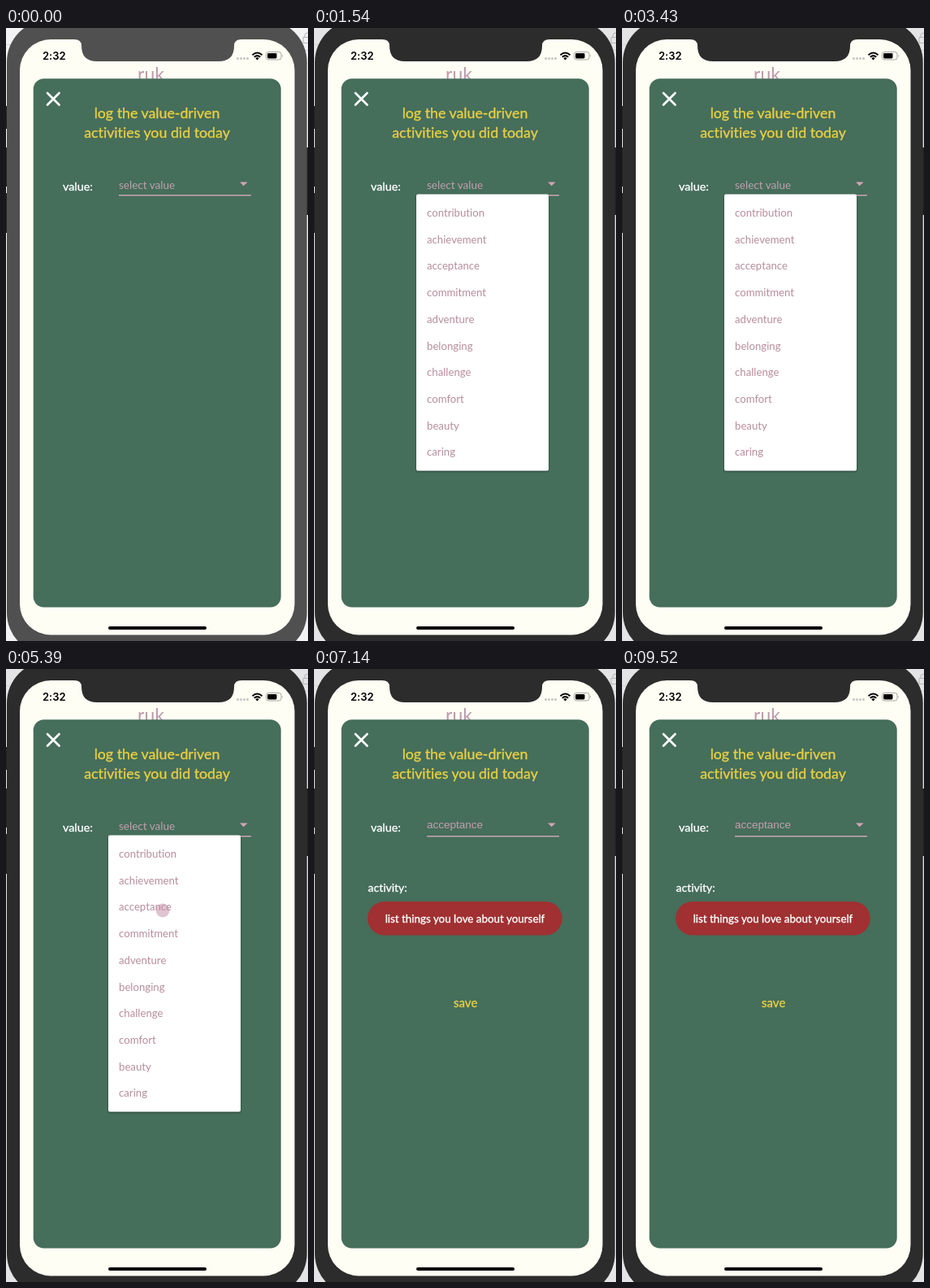
Animation, 372 px wide and 754 px high, one loop 9590 ms. Source, as an HTML page:

```html
<!DOCTYPE html>
<html lang="en">
<head>
<meta charset="utf-8">
<title>Activity log</title>
<style>
  html, body { margin: 0; width: 100%; height: 100%; overflow: hidden; background: #f3f3f5; }
  svg {
    display: block; width: 100%; height: 100%;
    font-family: Lato, "Open Sans", sans-serif; font-variant-ligatures: none;
  }
  .rose { fill: #c49fae; }
  .yellow { fill: #e8cf43; stroke: #e8cf43; stroke-width: .35; }
  .white { fill: #fff; stroke: #fff; stroke-width: .35; }
  .mid { text-anchor: middle; }
</style>
</head>
<body>
<svg viewBox="0 0 372 754">
  <defs>
    <clipPath id="row"><rect x="126" y="277" width="163" height="32.7"/></clipPath>
    <filter id="lift" x="-10%" y="-10%" width="120%" height="120%">
      <feDropShadow dx="0" dy="1" stdDeviation="1.2" flood-color="#000" flood-opacity=".45"/>
    </filter>
  </defs>

  <rect id="desk" width="372" height="754"/>
  <path d="M0 20.500H8M364 27.500H372" stroke="#d4d4d6"/>
  <path d="M366 11.500H373V18.500H366ZM368 11V9Q368 6 372 6" fill="none" stroke="#b4b4b8"/>

  <!-- phone body -->
  <path d="M0 96H3V124H0ZM0 147H3V195H0ZM0 203H3V252H0ZM369 147H372V230H369Z" fill="#222"/>
  <rect id="bezel" x="1" y="-10" width="369.700" height="781" rx="52"/>
  <rect x="17" y="14" width="338.500" height="732.500" rx="38" fill="#fffef4"/>
  <path id="notch" d="M84 13V14Q93 14 93 22Q93 41 112 41H262Q281 41 281 22Q281 14 290 14V13Z"/>

  <!-- status bar -->
  <text x="45" y="39" font-family="Inter, Roboto, sans-serif" font-size="13" font-weight="600">2:32</text>
  <g fill="#c4c4c0">
    <circle cx="285.500" cy="37.500" r="1.500"/><circle cx="289.500" cy="37.500" r="1.500"/>
    <circle cx="293.500" cy="37.500" r="1.500"/><circle cx="297.500" cy="37.500" r="1.500"/>
  </g>
  <g fill="none" stroke="#000" stroke-width="2">
    <path d="M303.500 33.200Q309.500 27.800 315.500 33.200M305.800 35.800Q309.500 32.500 313.200 35.800"/>
    <path d="M307.300 37.200Q309.500 35.300 311.700 37.200L309.500 39.500Z" fill="#000" stroke="none"/>
  </g>
  <rect x="320.500" y="29.500" width="18.500" height="9.500" rx="2.700" fill="none" stroke="#a5a5a0"/>
  <rect x="322" y="31" width="11.500" height="6.500" rx="1.400"/>
  <path d="M340.300 32.500Q342 34.200 340.300 36Z" fill="#a5a5a0"/>

  <text class="mid" x="178.500" y="65" font-size="23" fill="#bd9bad">ruk</text>

  <!-- card -->
  <rect x="33.700" y="62.300" width="305" height="650.200" rx="13" fill="#456e5b"/>
  <path d="M51 80L65.500 94.500M65.500 80L51 94.500" stroke="#fff" stroke-width="2.700" stroke-linecap="round"/>
  <g class="yellow mid" font-size="17.800">
    <text x="186" y="111">log the value-driven</text>
    <text x="186" y="135">activities you did today</text>
  </g>
  <text class="white" x="70" y="200" font-size="14.300">value:</text>
  <text id="hint" class="rose" x="139" y="197.500" font-size="13.500">select value</text>
  <text id="choice" class="rose" x="139" y="196" font-size="13.500"
        font-family="Liberation Sans, Inter, sans-serif">acceptance</text>
  <path d="M139 205.800H302" stroke="#c9a4b4" stroke-width="1.500"/>
  <path d="M288 189.500H297.500L292.700 194.300Z" fill="#d3a3b5"/>

  <g id="activity">
    <text class="white" x="66.500" y="274" font-size="14">activity:</text>
    <rect id="pill" x="66" y="286" width="239.700" height="41.600" rx="20.800"/>
    <text class="white mid" x="186" y="312" font-size="13.400">list things you love about yourself</text>
  </g>
  <text id="save" class="yellow mid" x="186.700" y="416" font-size="15">save</text>

  <g id="menu">
    <rect x="126" y="204.500" width="163" height="340" rx="2" fill="#fff" filter="url(#lift)"/>
    <g id="items" fill="#b78d9d" font-size="13.200"></g>
    <circle id="ripple" cx="193" cy="297" fill="#c58ba5" clip-path="url(#row)"/>
  </g>

  <rect x="126" y="736" width="121" height="4" rx="2"/>
</svg>
<script>
  const LOOP = 9590;
  const FOCUS = 1050, OPEN = 1290, PICK = 5370, REVEAL = 5460;
  const CLOSE = 5610, CHOSEN = 5870, MARKED = 7140;
  const FADE_IN = 225, FADE_OUT = 250, RIPPLE = 400;

  const el = id => document.getElementById(id);
  const span = (t, start, length) => Math.min(1, Math.max(0, (t - start) / length));
  const ease = p => p < .5 ? 2 * p * p : 1 - 2 * (1 - p) ** 2;
  const show = (id, on) => { el(id).style.display = on ? "" : "none"; };

  const words = ["contribution", "achievement", "acceptance", "commitment", "adventure",
    "belonging", "challenge", "comfort", "beauty", "caring"];
  words.forEach((word, i) => {
    const text = document.createElementNS("http://www.w3.org/2000/svg", "text");
    text.setAttribute("x", 139);
    text.setAttribute("y", 232 + i * 32.7);
    text.textContent = word;
    el("items").append(text);
  });

  function draw(t) {
    const active = t >= FOCUS;
    const shell = active ? "#2c2c2c" : "#505050";
    el("desk").setAttribute("fill", active ? "#e4e4e6" : "#f3f3f5");
    el("bezel").setAttribute("fill", shell);
    el("notch").setAttribute("fill", shell);

    const opacity = ease(span(t, OPEN, FADE_IN)) - ease(span(t, CLOSE, FADE_OUT));
    show("menu", opacity > 0);
    el("menu").setAttribute("opacity", opacity);

    const p = span(t, PICK, RIPPLE);
    show("ripple", p > 0);
    el("ripple").setAttribute("r", 82 * p * (2 - p));
    el("ripple").setAttribute("opacity", .54 * (1 - p));

    show("hint", t < CHOSEN);
    show("choice", t >= CHOSEN);
    show("activity", t >= REVEAL);
    show("save", t >= MARKED);
    el("pill").setAttribute("fill", t < MARKED ? "#d897b1" : "#a03031");
  }

  const begin = performance.now();
  function tick() {
    draw((performance.now() - begin) % LOOP);
    requestAnimationFrame(tick);
  }
  tick();
</script>
</body>
</html>
```
